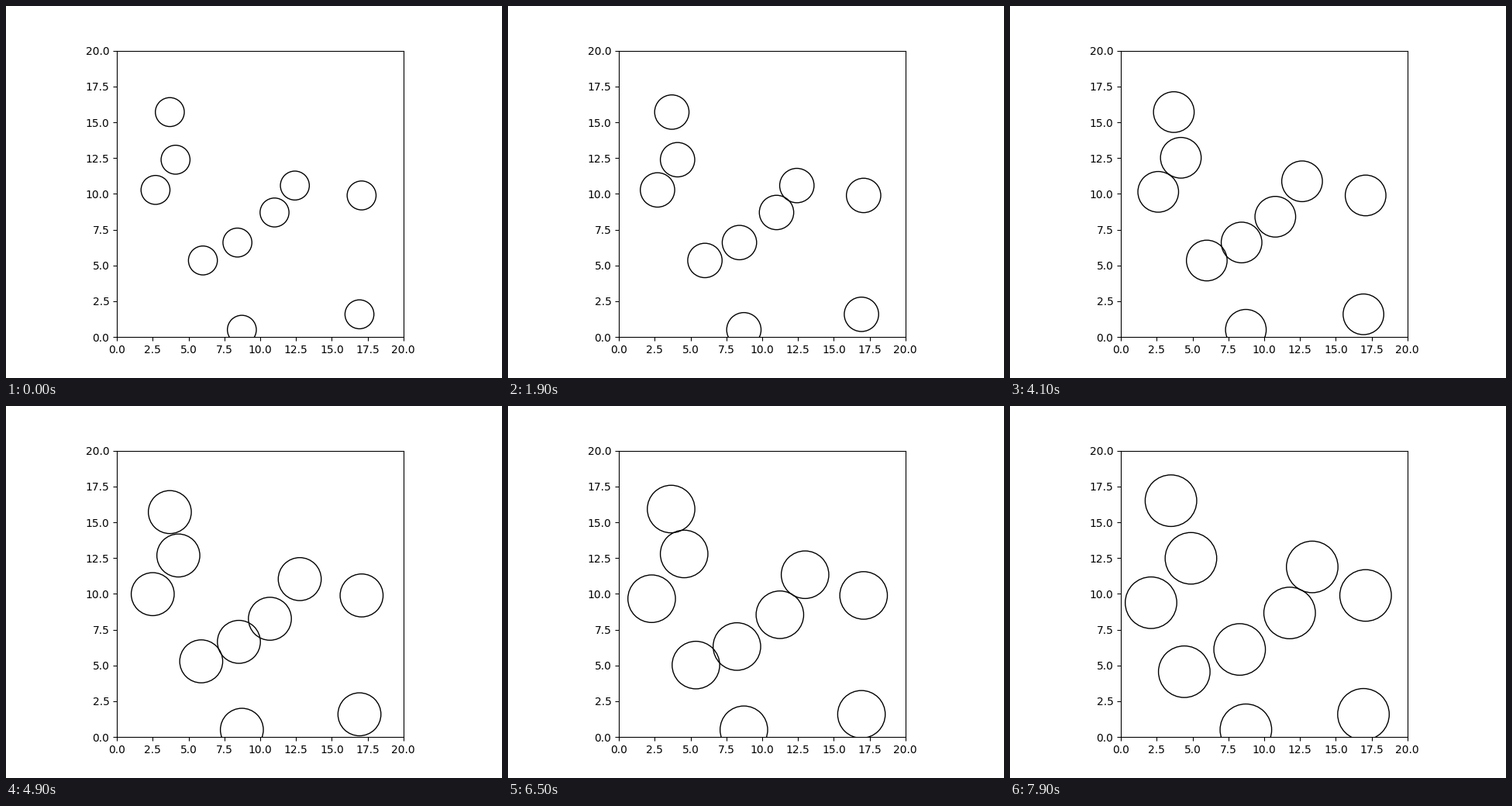
Write a matplotlib script that moves like this. It is 640 px wide and 480 px high and loops after 8 s.

```python
import matplotlib.pyplot as plt
import numpy as np
from matplotlib.animation import FuncAnimation
from matplotlib.patches import Circle

FRAMES = 80
SIZE = 20
STIFFNESS = 0.023

START = np.array([
    (3.69, 15.71), (4.09, 12.385), (2.69, 10.275), (12.42, 10.58),
    (11.0, 8.70), (8.41, 6.60), (6.0, 5.35),
    (8.72, 0.51), (16.93, 1.59), (17.08, 9.89),
])


def radius(n):
    return 1.01 + 0.01 * n


def push(pos, r):
    """Spring force on every disc from the discs it overlaps."""
    gap = pos[:, None] - pos[None]
    dist = np.hypot(gap[..., 0], gap[..., 1])
    np.fill_diagonal(dist, np.inf)
    overlap = np.maximum(2 * r - dist, 0)
    return STIFFNESS * ((overlap / dist)[..., None] * gap).sum(axis=1)


def simulate():
    """Centres of all growing discs, stepped with explicit Euler."""
    pos, vel = START, np.zeros_like(START)
    track = []
    for n in range(FRAMES):
        track.append(pos)
        force = push(pos, radius(n))
        pos = pos + vel
        vel = vel + force
    return track


track = simulate()

fig, ax = plt.subplots(figsize=(6.4, 4.8), dpi=100)
ax.set_aspect("equal")
ax.set_xlim(0, SIZE)
ax.set_ylim(0, SIZE)

discs = [ax.add_patch(Circle(p, radius(0), fill=False)) for p in START]


def update(n):
    for disc, center in zip(discs, track[n]):
        disc.center = center
        disc.radius = radius(n)
    return discs


anim = FuncAnimation(fig, update, frames=FRAMES, interval=100,
                     repeat=True, repeat_delay=0)
plt.show()
```
